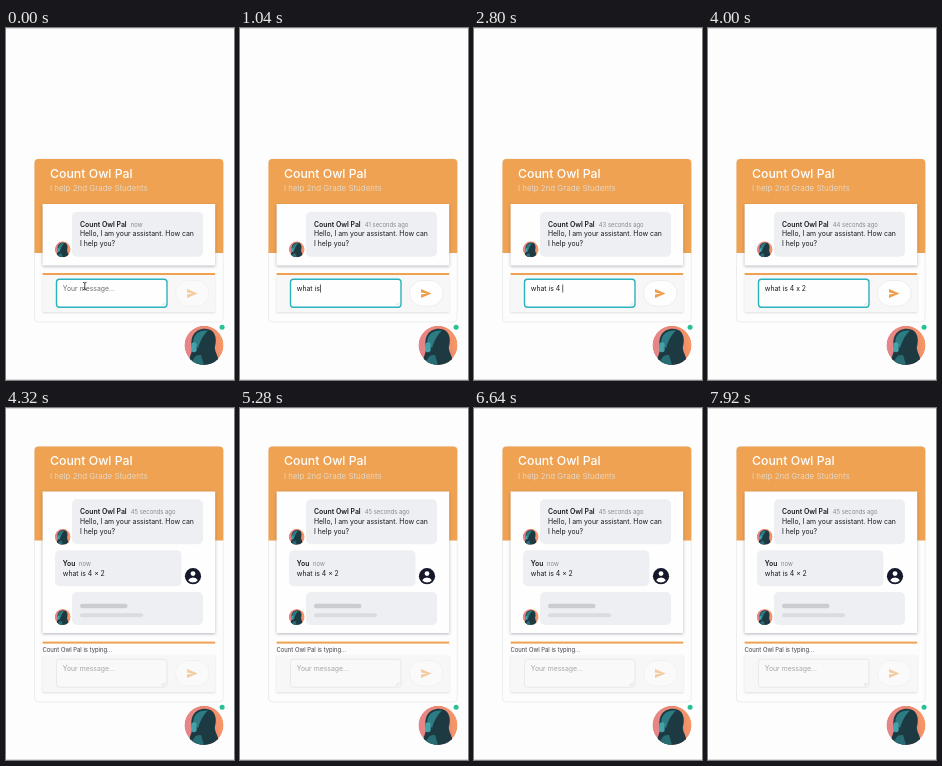
Recreate the animation shown at these times as an HTML page. Size 228 by 352 pixels, loop 8 s.

```html
<!DOCTYPE html>
<html lang="en">
<head>
<meta charset="utf-8">
<title>Chat assistant</title>
<style>
html, body { margin: 0; width: 100%; height: 100%; overflow: hidden; background: #fdfdfd; }
svg { display: block; width: 228px; height: 352px; }
text { font: 400 6.88px Inter, sans-serif; fill: #16181d; white-space: pre; }
.title { font-size: 12.3px; font-weight: 500; fill: #fff; }
.sub { font-size: 7.95px; fill: #e6d5c2; }
.name { font-weight: 600; font-size: 6.9px; }
.small { font-size: 5.9px; fill: #85888f; }
.typing { font-size: 5.9px; fill: #3c3f45; }
.bubble { fill: #eeeff3; }
.panel { fill: #fefefe; filter: drop-shadow(0 1px 1.5px rgba(60, 64, 90, .38)); }
.plain { font-feature-settings: "calt" 0; }
</style>
</head>
<body>
<svg viewBox="0 0 228 352">
  <defs>
    <linearGradient id="glow" x2="1" y2="-.2">
      <stop offset="0" stop-color="#e58588"/>
      <stop offset=".6" stop-color="#ee8a70"/>
      <stop offset="1" stop-color="#fba05f"/>
    </linearGradient>
    <clipPath id="round"><circle r="20"/></clipPath>
    <g id="face" clip-path="url(#round)">
      <circle r="20" fill="url(#glow)"/>
      <path d="M-16 20C-15 12-13 9-12 4C-15-8-10-17 1-17C11-17 14-8 11 2C11 7 14 9 16 20Z" fill="#1d3a43"/>
      <path d="M-11-3C-11-12-4-16 4-15C0-11-4-5-6 3Z" fill="#2d7b83"/>
      <path d="M-13 20C-11 12-8 9-3 10L0 20Z" fill="#286c74"/>
      <rect x="-13" y="-3" width="5.5" height="10" rx="2.7" fill="#44a3aa"/>
    </g>
    <path id="plane" d="M0 0L10.5 4.5L0 9V5.5L6 4.5L0 3.5Z"/>
  </defs>

  <path d="M0 .5H228M0 351.5H228" stroke="#dcdcdc"/>

  <rect id="card" x="28.5" width="188.7" rx="4" fill="#fdfdfd" stroke="#ecedef"/>
  <g id="head">
    <path d="M28.5 94.5V4.5Q28.5 .5 32.5 .5H213.3Q217.3 .5 217.3 4.5V94.5Z" fill="#efa251"/>
    <text class="title" x="44" y="19.4">Count Owl Pal</text>
    <text class="sub" x="44" y="32.5">I help 2nd Grade Students</text>
    <rect id="panel" class="panel" x="36.6" y="45.5" width="172.6"/>
    <rect class="bubble" x="66" y="53.3" width="131" height="45" rx="5"/>
    <use href="#face" transform="translate(56.7 90.8) scale(.4)"/>
    <text class="name" x="74" y="68">Count Owl Pal</text>
    <text class="small" id="age" x="124.8" y="68">now</text>
    <text x="74" y="77.9">Hello, I am your assistant. How can</text>
    <text x="74" y="87.7">I help you?</text>
  </g>

  <g id="reply">
    <rect class="bubble" x="49" y="142.2" width="126.5" height="36" rx="5"/>
    <text class="name" x="56.8" y="157.7">You</text>
    <text class="small" x="73" y="157.7">now</text>
    <text x="56.8" y="167.6">what is 4 × 2</text>
    <circle cx="187" cy="168.2" r="8.1" fill="#14182a"/>
    <circle cx="187" cy="165.6" r="2.4" fill="#fff"/>
    <path d="M182.2 172.2Q183.5 169.6 187 169.6T191.8 172.2Q190 174.4 187 174.4T182.2 172.2Z" fill="#fff"/>
    <rect class="bubble" x="66" y="184" width="131" height="33" rx="5"/>
    <rect x="74" y="195.8" width="47.5" height="4.4" rx="2.2" fill="#cbccd2"/>
    <rect x="74" y="205.3" width="63" height="4" rx="2" fill="#dbdce0"/>
    <use href="#face" transform="translate(56.7 209) scale(.4)"/>
    <text class="typing" x="36.5" y="244.1">Count Owl Pal is typing...</text>
  </g>

  <rect id="bar" x="36.6" width="172.6" height="2" fill="#efa251"/>
  <rect x="36.6" y="247.4" width="172.6" height="36.6" fill="#f7f7f7" style="filter:drop-shadow(0 1px 1px rgba(0,0,0,.12))"/>
  <rect id="box" x="50.5" y="251.2" width="110.5" height="28" rx="3"/>
  <path d="M156 277.5L159 274.5M158 277.5L159 276.5" stroke="#b5b5b5" stroke-width=".5"/>
  <text id="draft" class="plain" x="56.8" y="262.8"></text>
  <rect id="caret" y="256.5" width=".7" height="8" fill="#222"/>
  <path id="beam" d="M77 254.3Q78.8 254.3 78.8 255.6Q78.8 254.3 80.6 254.3M78.8 255.6V260.4M77 261.7Q78.8 261.7 78.8 260.4Q78.8 261.7 80.6 261.7" fill="none" stroke="#222" stroke-width=".8"/>
  <rect id="send" x="169.5" y="252.5" width="33.5" height="25.6" rx="12.8" stroke-width=".6"/>
  <use id="icon" href="#plane" x="181" y="260.9" fill="#ef9d4a"/>

  <use href="#face" transform="translate(198 317.3) scale(.98)"/>
  <circle cx="216.1" cy="299.2" r="2.5" fill="#27c195"/>
</svg>
<script>
const LOOP = 8000, SENT = 4320;
const MESSAGE = "what is 4 x 2";
// when each letter is typed, ms
const KEYS = [320, 400, 480, 560, 640, 800, 960, 1120, 2240, 2560, 3040, 3200, 3440];
const FIRST_TICK = 240;

const $ = id => document.getElementById(id);
const set = (id, attrs) => {
  for (const k in attrs) $(id).setAttribute(k, attrs[k]);
};
const show = (id, on) => { $(id).style.display = on ? "" : "none"; };

function draw(t) {
  const sent = t >= SENT;
  const count = KEYS.filter(k => k <= t).length;
  const typed = sent ? "" : MESSAGE.slice(0, count);
  const last = sent ? SENT : KEYS[count - 1];
  const active = typed.length > 0;
  const top = sent ? 38 : 130.5;

  set("card", { y: top + .5, height: 293.5 - top });
  set("head", { transform: `translate(0 ${top})` });
  set("panel", { height: sent ? 141.5 : 61.5 });
  set("bar", { y: sent ? 233.6 : 245 });
  set("box", {
    fill: sent ? "#f9f9f9" : "#fefefe",
    stroke: sent ? "#e3e4e6" : "#2bb3bd",
    "stroke-width": sent ? .8 : 1.4
  });
  set("send", {
    fill: active ? "#fefefe" : "#fafafa",
    stroke: active ? "#e4e4e4" : "#ececec"
  });
  set("icon", { opacity: active ? 1 : .5 });

  // the age is refreshed by key presses only
  $("age").textContent = last === undefined ? "now"
    : 41 + Math.floor((last - FIRST_TICK) / 1000) + " seconds ago";
  const draft = $("draft");
  draft.textContent = typed || "Your message...";
  draft.style.fill = active ? "#16181d" : sent ? "#a3a5a9" : "#6b6e73";

  show("reply", sent);
  show("beam", !sent && !active);
  show("caret", active && (t - last) % 1000 < 500);
  if (active) set("caret", { x: 57.1 + draft.getComputedTextLength() });
}

const start = performance.now();
function tick() {
  draw((performance.now() - start) % LOOP);
  requestAnimationFrame(tick);
}
draw(0);
requestAnimationFrame(tick);
</script>
</body>
</html>
```
